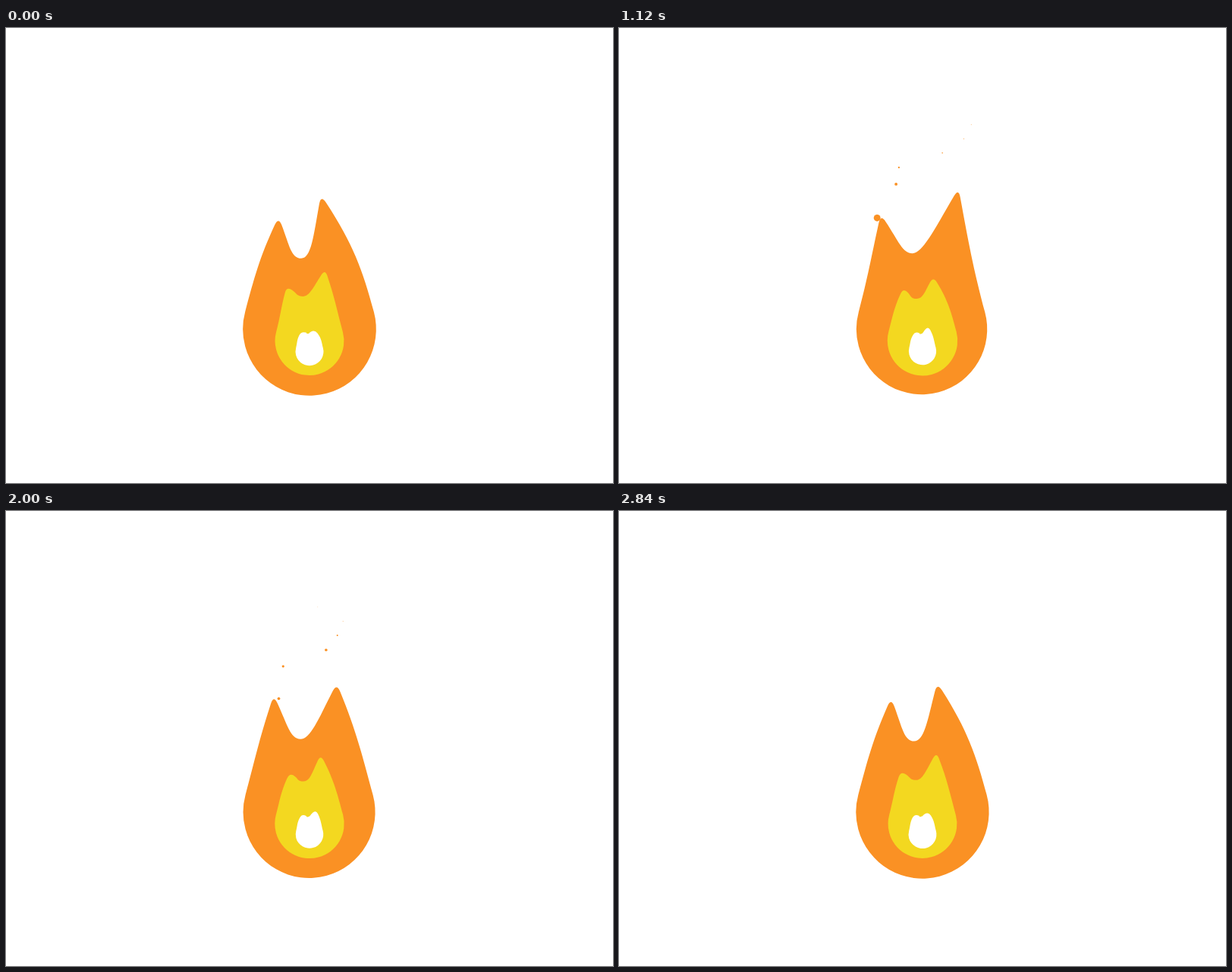
An HTML page with a canvas for the animation above (2880 ms loop, 800x600 px).

```html
<!DOCTYPE html>
<html lang="en">
<head>
<meta charset="utf-8">
<title>Flame</title>
<style>
  html, body { margin: 0; width: 100%; height: 100%; overflow: hidden; background: #fff; }
  canvas { display: block; }
</style>
</head>
<body>
<canvas id="stage" width="800" height="600"></canvas>
<script>
const ctx = document.getElementById('stage').getContext('2d');
const LOOP = 2880, STEP = 40, FLICKER = 720, PULSE = 1440;
const CENTER = { x: 400, y: 397 };
const ORANGE = '#fa9124', YELLOW = '#f3d820', WHITE = '#fff';
const SHOULDER = 15 * Math.PI / 180, LEAN = Math.tan(SHOULDER);
const wave = (time, period) => Math.cos(2 * Math.PI * time / period);

// Each tip passes four key points per flicker, relative to CENTER.
// Valley is the rest position of the dip between the tips.
const KEY_TIMES = [0, 220, 400, 680];
const LAYERS = [
  { color: ORANGE, baseY: 0, radius: 87, swell: 0, sway: 1, cap: 12,
    valley: [-3.5, -68], valleyWidth: 13,
    left: [[-40.6, -141.3], [-52, -136.5], [-54.6, -147.5], [-41.2, -144]],
    right: [[16, -170], [24.5, -192.8], [47, -182], [20, -164]] },
  { color: YELLOW, baseY: 15.4, radius: 45, swell: 1.7, sway: 0, cap: 9,
    valley: [-3.2, -25.5], valleyWidth: 8,
    left: [[-28.5, -52.5], [-28.2, -54.7], [-24.8, -51.5], [-27.3, -50.7]],
    right: [[19.8, -74.3], [18.6, -62.6], [14.4, -66], [18, -74.5]] },
  { color: WHITE, baseY: 29.4, radius: 18.3, swell: 0, sway: 0, cap: 6,
    valley: [-.9, 12], valleyWidth: 3,
    left: [[-10, 4.6], [-9.6, 5], [-9, 4.8], [-9.8, 4.3]],
    right: [[6.4, 2.6], [7.4, .9], [7.3, -1.5], [7.2, 1.5]] }
];

// Smooth periodic curve through unevenly timed key points.
function follow(keys, time) {
  const n = keys.length;
  const when = i => KEY_TIMES[(i + n) % n] + FLICKER * Math.floor(i / n);
  const gap = i => when(i + 1) - when(i);
  let k = n - 1;
  while (when(k) > time) k--;
  const u = (time - when(k)) / gap(k), ease = u * u * (3 - 2 * u);
  return [0, 1].map(axis => {
    const value = i => keys[(i + n) % n][axis];
    const rate = i => (value(i + 1) - value(i)) / gap(i);
    const tangent = i =>
      (gap(i) * rate(i - 1) + gap(i - 1) * rate(i)) / (gap(i - 1) + gap(i));
    return value(k) + (value(k + 1) - value(k)) * ease
      + gap(k) * u * (1 - u) * ((1 - u) * tangent(k) - u * tangent(k + 1));
  });
}

// Horizontal run per unit of fall between two points.
const slope = ([x1, y1], [x2, y2]) => (x2 - x1) / (y2 - y1);

// Curve handle leaving a point along a slope.
const handle = ([x, y], run, fall) => [x + run * fall, y + fall];

// Rounded tip: ends and control point of a quadratic curve.
function roundTip([x, y], runLeft, runRight, size) {
  const [a, b] = [runLeft, runRight].map(run => {
    const length = Math.hypot(run, 1);
    return [run * size / length, size / length];
  });
  const px = x - (a[0] + b[0]) / 4, py = y - (a[1] + b[1]) / 4;
  return { start: [px + a[0], py + a[1]], peak: [px, py], end: [px + b[0], py + b[1]] };
}

function drawLayer(layer, time) {
  const { baseY, cap, valleyWidth } = layer;
  const breath = (1 - wave(time, FLICKER)) / 2;
  const radius = layer.radius + layer.swell * breath, baseX = -layer.sway * breath;
  const leftTip = follow(layer.left, time), rightTip = follow(layer.right, time);

  const shoulderX = radius * Math.cos(SHOULDER);
  const shoulderY = baseY - radius * Math.sin(SHOULDER);
  const leftBase = [baseX - shoulderX, shoulderY], rightBase = [baseX + shoulderX, shoulderY];

  // The dip sways along with the left tip.
  const vx = layer.valley[0] + .18 * leftTip[0], vy = layer.valley[1] + .6 * leftTip[0];
  const leftRim = [vx - valleyWidth, vy], rightRim = [vx + valleyWidth, vy];

  // Outer edges bow evenly between shoulder and tip, inner edges aim at the dip.
  const outerLeft = 2 * slope(leftTip, leftBase) + LEAN;
  const outerRight = 2 * slope(rightTip, rightBase) - LEAN;
  const innerLeft = 1.1 * slope(leftTip, leftRim), innerRight = slope(rightTip, rightRim);
  const left = roundTip(leftTip, outerLeft, innerLeft, cap);
  const right = roundTip(rightTip, innerRight, outerRight, cap);
  const leftRise = shoulderY - left.start[1], rightRise = shoulderY - right.end[1];

  ctx.fillStyle = layer.color;
  ctx.beginPath();
  ctx.moveTo(...leftBase);
  ctx.bezierCurveTo(...handle(leftBase, -LEAN, -.38 * leftRise),
    ...handle(left.start, outerLeft, .38 * leftRise), ...left.start);
  ctx.quadraticCurveTo(...left.peak, ...left.end);
  ctx.bezierCurveTo(...handle(left.end, innerLeft, .6 * (vy - left.end[1])),
    ...leftRim, vx, vy);
  ctx.bezierCurveTo(...rightRim,
    ...handle(right.start, innerRight, .6 * (vy - right.start[1])), ...right.start);
  ctx.quadraticCurveTo(...right.peak, ...right.end);
  ctx.bezierCurveTo(...handle(right.end, outerRight, .38 * rightRise),
    ...handle(rightBase, LEAN, -.38 * rightRise), ...rightBase);
  ctx.arc(baseX, baseY, radius, -SHOULDER, Math.PI + SHOULDER);
  ctx.fill();
}

// Sparks leave the flame one by one, sweeping from side to side.
// Each bursts out, then drifts up steadily and shrinks away.
const SPARK_COUNT = 17, SPARK_GAP = 125;
const random = seed => {
  const value = Math.sin(seed * 12.9898) * 43758.5453;
  return value - Math.floor(value);
};

function drawSpark(index, time) {
  const pick = (salt, low, high) => low + (high - low) * random(index * 4 + salt);
  const birth = 60 + index * SPARK_GAP, age = time - birth, life = pick(1, 550, 760);
  if (age < 0 || age >= life) return;
  const burst = Math.exp(-age / 60);
  const side = -5 - 58 * wave(birth, 1000) + pick(2, -20, 20);
  const x = 400 + side * (1 - .4 * burst) + pick(3, -.015, .03) * age;
  const y = 230 + 80 * burst - .15 * age;
  ctx.beginPath();
  ctx.arc(x, y, pick(4, 1.8, 5) * (1 - age / life), 0, 2 * Math.PI);
  ctx.fill();
}

function draw(now) {
  const time = Math.floor(now % LOOP / STEP) * STEP;
  ctx.setTransform(1, 0, 0, 1, 0, 0);
  ctx.fillStyle = WHITE;
  ctx.fillRect(0, 0, 800, 600);
  ctx.fillStyle = ORANGE;
  for (let i = 0; i < SPARK_COUNT; i++) drawSpark(i, time);

  const scale = 1 + .0145 * wave(time - 200, PULSE);
  ctx.translate(CENTER.x, CENTER.y);
  ctx.scale(scale, scale);
  LAYERS.forEach(layer => drawLayer(layer, time % FLICKER));
}

const start = performance.now();
function tick() {
  draw(performance.now() - start);
  requestAnimationFrame(tick);
}
tick();
</script>
</body>
</html>
```
